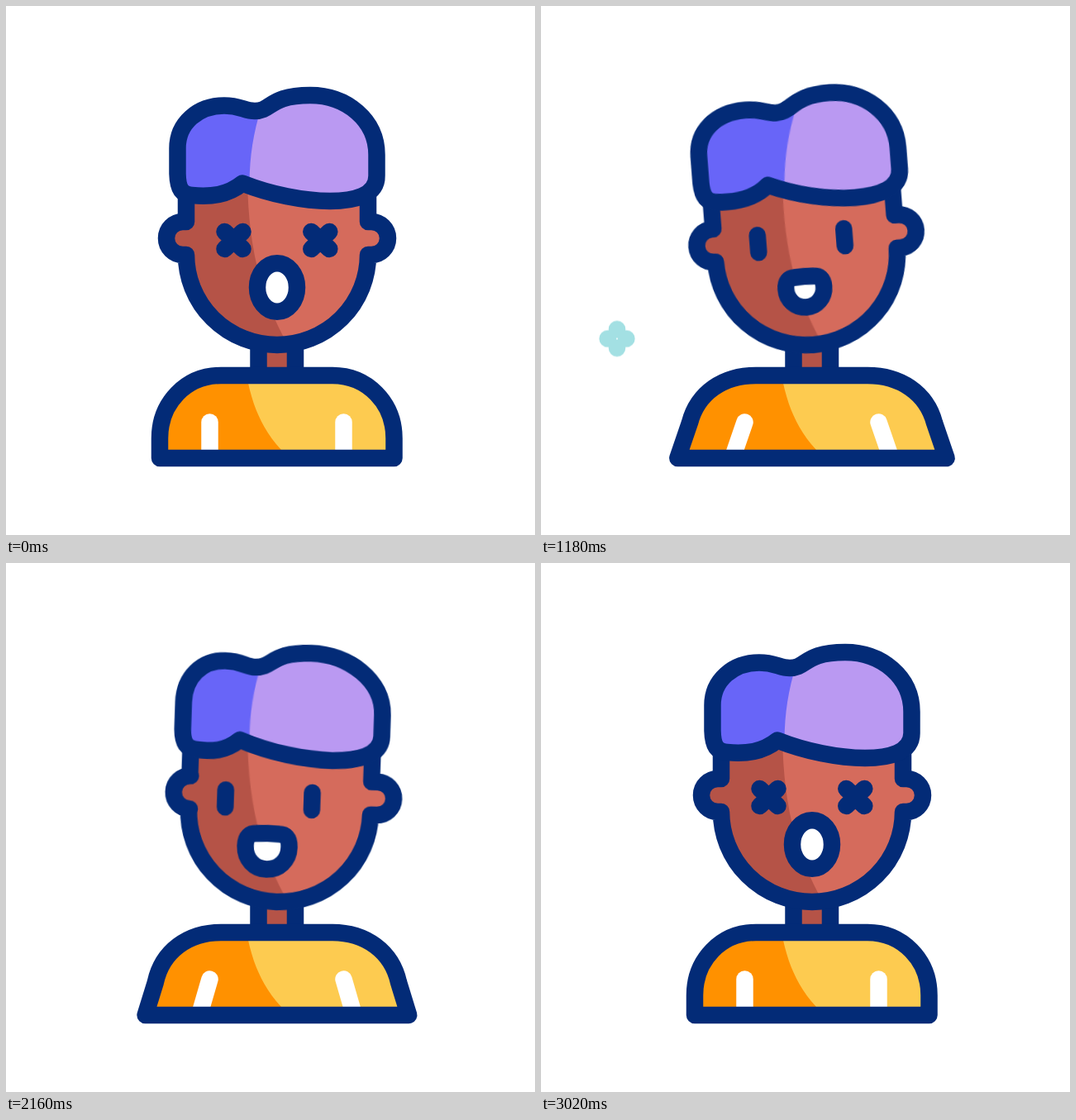
An HTML page without scripts for the animation above (3100 ms loop, 640x640 px).

```html
<!DOCTYPE html>
<html lang="en">
<head>
<meta charset="utf-8">
<title>Mood swing</title>
<style>
html, body { margin: 0; width: 100%; height: 100%; overflow: hidden; background: #fff; }
svg { display: block; width: 100vw; height: 100vh; }

:root {
  --ease: cubic-bezier(.37, 0, .63, 1);
  /* shoulders: resting, half spread, fully spread */
  --body0: path("M186 547L186 523C186 480 218 447 260 447L395 447C437 447 469.5 480 469.5 523L469.5 547Z");
  --body1: path("M177 547L183.3 515C187.5 474.7 219.1 447 260 447L395 447C436 447 467.5 474.7 472.4 515L478.5 547Z");
  --body2: path("M162.5 547L179 502C190 466 221 447 260 447L395 447C434 447 466 466 477 502L493.5 547Z");
  /* hair: front, turned right, turned left */
  --hair0: path("M207.5 172L207.5 203C208 222 213 228 225 229C248 231 268 229 286 214.5C320 228 360 236 392 236C420 236 449 230 448.5 205L448.5 180C448.5 138 412 108 368 108C318 108 322 127 301 127C288 127 284 120.5 264 120.5C232 120.5 207.5 142 207.5 172Z");
  --hair1: path("M207.5 172L207.5 203C208 222 213 228 225 229C254 231 290 226 309 208.5C340 225 370 234 396 235C420 236 449 230 448.5 205L448.5 180C448.5 138 428 108 392 106C350 106 346 127 325 126C312 126 308 119 288 120.5C238 122 207.5 142 207.5 172Z");
  --hair2: path("M207.5 172L207.5 205C208 222 213 228 225 229C244 231 260 230 277 215.5C314 230 356 237 390 237C420 236 449 230 448.5 205L448.5 180C448.5 138 405 108 360 108C311 108 315 127 293 127C281 127 277 120.5 256 120.5C228 120.5 207.5 142 207.5 172Z");
  --head0: path("M218 222L218 261L214 261A20 20 0 0 0 214 301L218 301A110 109 0 0 0 438 301L442 301A20 20 0 0 0 442 261L438 261L438 222");
  --head1: path("M218 222L218 261L212 261A20 20 0 0 0 212 301L218 301A110 109 0 0 0 438 301L437 301A20 20 0 0 0 437 261L438 261L438 222");
  --head2: path("M218 222L218 261L219 261A20 20 0 0 0 219 301L218 301A110 109 0 0 0 438 301L445.5 301A20 20 0 0 0 445.5 261L438 261L438 222");
  --cross: path("M-11 -10.5L11 10.5M11 -10.5L-11 10.5");
  --bar: path("M0 -10.5L0 10.5M0 -10.5L0 10.5");
  --smile0: path("M-4 -1C-4 -3 -3 -4 -2 -4C-1 -4 1 -4 2 -4C3 -4 4 -3 4 -1C4 2 3 4 0 4C-3 4 -4 2 -4 -1Z");
  --smile1: path("M-23 -5C-23 -15 -18 -18.5 -12 -18.5C-5 -19 5 -19 12 -18.5C18 -18.5 23 -15 23 -5C23 8 13 18.5 0 18.5C-13 18.5 -23 8 -23 -5Z");
  --smile2: path("M-27 -5C-27 -16 -21 -19 -15 -18C-5 -16 5 -16 15 -18C21 -19 27 -16 27 -5C27 9 15 19 0 19C-15 19 -27 9 -27 -5Z");
  --smile3: path("M-26.5 -6C-26.5 -18 -21 -21.5 -14 -21.5C-6 -22 6 -22 14 -21.5C21 -21.5 26.5 -18 26.5 -6C26.5 10 15 21.5 0 21.5C-15 21.5 -26.5 10 -26.5 -6Z");
}

.tilt, .level, .face, .body, .arm, .hair, .head, .eye, .gasp, .smile, .spark {
  animation: 3.1s var(--ease) infinite;
}
.line { fill: none; stroke: #032b77; stroke-width: 20.5; stroke-linecap: round; stroke-linejoin: round; }
.lit { fill: #fff; }

.tilt, .level { transform-origin: 328px 392px; }
.tilt { animation-name: tilt; }
.level { animation-name: level; }
@keyframes tilt {
  0%, 97.42%, 100% { transform: rotate(0deg); }
  19.35%, 38.06% { transform: rotate(-4.4deg); }
  64.52%, 69.68% { transform: rotate(1.9deg); }
}
@keyframes level {
  0%, 97.42%, 100% { transform: rotate(0deg); }
  19.35%, 38.06% { transform: rotate(4.4deg); }
  64.52%, 69.68% { transform: rotate(-1.9deg); }
}

.face { animation-name: face; }
@keyframes face {
  0%, 85.16%, 100% { transform: translate(0px, 0px); }
  19.35%, 22.58% { transform: translate(12px, -8px); }
  48.39%, 69.68% { transform: translate(-13.5px, 3.5px); }
}

.hair { d: var(--hair0); animation-name: hair; }
@keyframes hair {
  0%, 85.16%, 100% { d: var(--hair0); }
  19.35%, 22.58% { d: var(--hair1); }
  48.39%, 69.68% { d: var(--hair2); }
}

.head { d: var(--head0); animation-name: head; }
@keyframes head {
  0%, 85.16%, 100% { d: var(--head0); }
  19.35%, 22.58% { d: var(--head1); }
  48.39%, 69.68% { d: var(--head2); }
}

.body { d: var(--body0); animation-name: body; }
@keyframes body {
  0%, 31.61%, 96.45%, 100% { d: var(--body0); }
  40%, 56.13%, 74.19% { d: var(--body2); }
  47.74%, 64.19% { d: var(--body1); }
}

.arm { stroke: #fff; d: path("M0 0L0 43.5"); animation-name: arm; }
@keyframes arm {
  0%, 31.61%, 96.45%, 100% { d: path("M0 0L0 43.5"); }
  40%, 56.13%, 74.19% { d: path("M0 0L-17 43.5"); }
  47.74%, 64.19% { d: path("M0 0L-6.5 43.5"); }
}

.eye { d: var(--cross); animation-name: eye; }
@keyframes eye {
  0%, 26.45%, 79.35%, 100% { d: var(--cross); }
  30.97%, 74.84% { d: var(--bar); }
}

.gasp { rx: 24px; ry: 29.3px; animation-name: gasp; }
@keyframes gasp {
  0%, 19.35%, 83.87%, 100% { rx: 24px; ry: 29.3px; opacity: 1; }
  27.74%, 77.42% { rx: 3px; ry: 4px; opacity: 1; }
  27.75%, 77.41% { rx: 3px; ry: 4px; opacity: 0; }
}

.smile { d: var(--smile0); opacity: 0; animation-name: smile; }
@keyframes smile {
  0%, 27.74%, 77.42%, 100% { d: var(--smile0); opacity: 0; }
  27.75%, 77.41% { d: var(--smile0); opacity: 1; }
  38.06% { d: var(--smile1); opacity: 1; }
  50.32% { d: var(--smile2); opacity: 1; }
  62%, 69.68% { d: var(--smile3); opacity: 1; }
}

/* four rays shoot out, then their tails catch up */
.spark { stroke: #a3e0e3; opacity: 0; animation-name: spark; }
@keyframes spark {
  0% { d: path("M0 -11L0 -11M0 11L0 11M-11 0L-11 0M11 0L11 0"); opacity: 1; }
  7% { d: path("M0 -13L0 -29M0 13L0 29M-13 0L-29 0M13 0L29 0"); opacity: 1; }
  14% { d: path("M0 -34L0 -34.5M0 34L0 34.5M-34 0L-34.5 0M34 0L34.5 0"); opacity: 1; }
  14.01%, 100% { d: path("M0 -34L0 -34.5M0 34L0 34.5M-34 0L-34.5 0M34 0L34.5 0"); opacity: 0; }
}
</style>
</head>
<body>
<svg viewBox="0 0 640 640">
  <defs>
    <clipPath id="bodyClip"><path class="body"/></clipPath>
    <clipPath id="headClip"><path class="head"/></clipPath>
    <clipPath id="hairClip"><path class="hair"/></clipPath>
  </defs>

  <g>
    <path class="line spark" transform="translate(538 458)" style="animation-delay:-3s"/>
    <path class="line spark" transform="translate(538 123)" style="animation-delay:-2.91s"/>
    <path class="line spark" transform="translate(92 402.5)" style="animation-delay:-1.94s"/>
    <path class="line spark" transform="translate(538 458)" style="animation-delay:-.92s"/>
  </g>

  <path d="M305.5 405H350V447H305.5Z" fill="#b55347"/>
  <path class="line" d="M305.5 410V447M350 410V447"/>

  <path class="body" fill="#fdcb50"/>
  <g clip-path="url(#bodyClip)">
    <path d="M140 440H290C296 480 310 513 333 537L343 547V560H140Z" fill="#ff9100"/>
  </g>
  <path class="line arm" transform="translate(246.5 503.5)"/>
  <path class="line arm" transform="translate(408.5 503.5) scale(-1 1)"/>
  <path class="line body"/>

  <g class="tilt">
    <path class="head" fill="#d56b5c"/>
    <g clip-path="url(#headClip)">
      <path class="level" d="M292 190C291 290 308 350 341 410V430H150V190Z" fill="#b55347"/>
    </g>
    <path class="line head"/>

    <g class="face">
      <path class="line eye" transform="translate(275.5 283.5)"/>
      <path class="line eye" transform="translate(380.3 283.5)"/>
      <ellipse class="line lit gasp" cx="328" cy="340.5"/>
      <path class="line lit smile" transform="translate(328 346)"/>
    </g>

    <path class="hair" fill="#ba99f2"/>
    <g clip-path="url(#hairClip)">
      <path class="level" d="M312 90L309 122C299 155 295 180 294.5 215V250H150V90Z" fill="#6865f8"/>
    </g>
    <path class="line hair"/>
  </g>
</svg>
</body>
</html>
```
